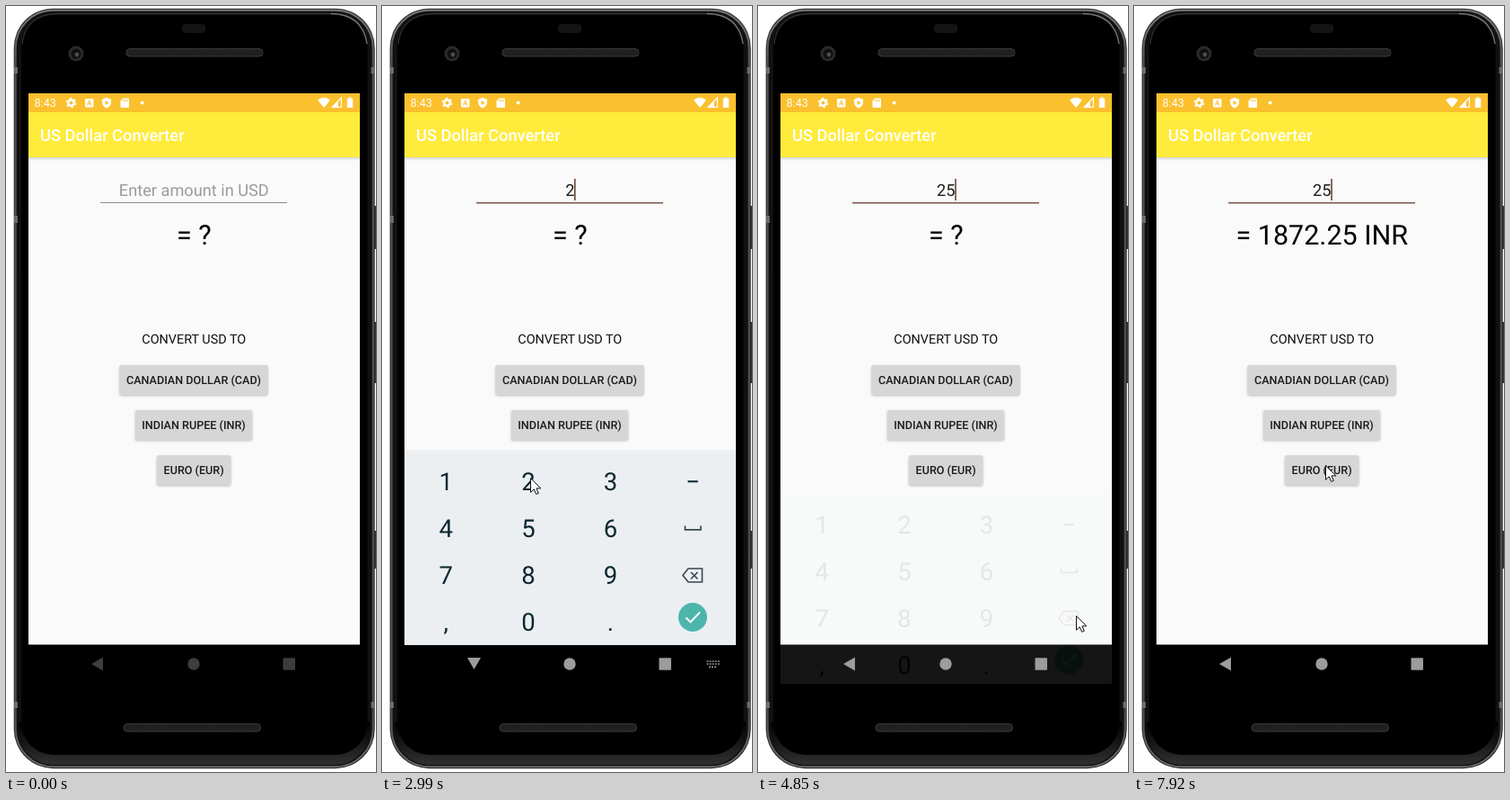
Recreate the animation shown at these times as an HTML page. Size 412 px wide and 851 px high, loop 8000 ms.

```html
<!DOCTYPE html>
<html lang="en">
<head>
<meta charset="utf-8">
<title>US Dollar Converter</title>
<style>
html, body { margin: 0; width: 100%; height: 100%; overflow: hidden; background: #fff; }
svg { display: block; width: 412px; height: 851px; }
text { font-family: Roboto, "Noto Sans", sans-serif; text-rendering: geometricPrecision; }
.mid { text-anchor: middle; }
.bold { font-weight: 500; }
</style>
</head>
<body>
<svg viewBox="0 0 412 851">
  <defs>
    <linearGradient id="rim" x1="0" y1="0" x2="0" y2="1">
      <stop offset="0" stop-color="#777"/><stop offset=".07" stop-color="#555"/>
      <stop offset=".93" stop-color="#505050"/><stop offset="1" stop-color="#6a6a6a"/>
    </linearGradient>
    <linearGradient id="shade" x1="0" y1="0" x2="0" y2="1">
      <stop offset="0" stop-color="#000" stop-opacity=".15"/><stop offset="1" stop-color="#000" stop-opacity="0"/>
    </linearGradient>
    <linearGradient id="foot" x1="0" y1="0" x2="0" y2="1">
      <stop offset="0" stop-color="#000"/><stop offset="1" stop-color="#303030"/>
    </linearGradient>
    <pattern id="mesh" width="3" height="3" patternUnits="userSpaceOnUse">
      <rect width="3" height="3" fill="#2c2c2c"/><path d="M0 0h1.5v1.5H0zM1.5 1.5H3V3H1.5z" fill="#141414"/>
    </pattern>
    <filter id="blur" x="-20%" y="-50%" width="140%" height="200%"><feGaussianBlur stdDeviation="1.4"/></filter>
    <clipPath id="window"><rect x="25" y="480" width="369" height="273"/></clipPath>
  </defs>

  <g id="phone">
    <path d="M410 222h2v48h-2zM410 351h2v68h-2zM410 583h2v42h-2z" fill="#333"/>
    <rect x="8.700" y="2.700" width="402" height="844.500" rx="44" fill="#2a2a2a"/>
    <rect x="10.700" y="4.700" width="398" height="840.500" rx="42" fill="#111" stroke="url(#rim)" stroke-width="2"/>
    <path d="M14 795H405V805A38 38 0 0 1 367 843H52A38 38 0 0 1 14 805Z" fill="url(#foot)"/>
    <rect x="17" y="10" width="385.500" height="822" rx="36" fill="#000"/>
    <path d="M362 8.500Q397 9 402 42" fill="none" stroke="#777" stroke-width="1.300"/>
    <path d="M18 42Q22 10 56 8.500H362" fill="none" stroke="#3c3c3c"/>
    <path d="M9 68h4v7h-4zM9 233h4v8h-4zM9 773h4v7h-4zM406.500 68h4v7h-4zM406.500 773h4v7h-4z" fill="#6d6d6d"/>
    <rect x="196" y="20" width="26" height="10" rx="4" fill="#141414"/>
    <circle cx="78" cy="53" r="8.500" fill="#2a2a2a"/>
    <circle cx="78" cy="53" r="5.500" fill="#101010"/>
    <circle cx="79" cy="54" r="2.400" fill="#4b4b4b"/>
    <rect x="134" y="47.500" width="152" height="8.500" rx="4" fill="url(#mesh)" stroke="#3a3a3a"/>
    <rect x="131" y="797.500" width="152.500" height="8.500" rx="4" fill="url(#mesh)" stroke="#3a3a3a"/>
  </g>

  <g id="app">
    <rect x="25" y="97" width="369" height="612.500" fill="#fafafa"/>
    <rect x="25" y="168" width="369" height="4" fill="url(#shade)"/>
    <rect x="25" y="97" width="369" height="21.500" fill="#fbc02d"/>
    <rect x="25" y="118" width="369" height="50" fill="#ffeb3b"/>
    <text x="38" y="150" font-size="18.300" class="bold" fill="#fff">US Dollar Converter</text>
  </g>

  <g id="status" fill="#fff">
    <text x="31.500" y="112" font-size="12.600">8:43</text>
    <circle cx="72.500" cy="107.500" r="3.200" fill="none" stroke="#fff" stroke-width="2.400"/>
    <circle cx="72.500" cy="107.500" r="4.800" fill="none" stroke="#fff" stroke-width="2" stroke-dasharray="2.500 2.527"/>
    <rect x="88" y="103" width="9.500" height="9.500" rx="1"/>
    <path d="M90.500 110.500L92.750 105L95 110.500M91.300 108.800H94.200" fill="none" stroke="#fbc02d"/>
    <path d="M112 101.800L117 103.700V107.500Q116.500 111.500 112 113.500Q107.500 111.500 107 107.500V103.700Z"/>
    <path d="M110.500 105L114.700 107.500L110.500 110Z" fill="#fbc02d"/>
    <path d="M130.500 102.500H136Q137 102.500 137 103.500V112Q137 113 136 113H128.500Q127.500 113 127.500 112V105.500Z"/>
    <path d="M130.700 104v2M132.700 104v2M134.700 104v2" stroke="#fbc02d"/>
    <circle cx="151.700" cy="107.500" r="1.900"/>
    <path d="M347 104.500Q354 99 361 104.500L354 113Z"/>
    <path d="M373.500 102V112.500H363Z" fill="none" stroke="#fff" stroke-width="1.200"/>
    <path d="M370 105.500V112.500H363Z"/>
    <path d="M381.500 101.500h3v1.200h1.700V113h-6.400V102.700h1.700Z"/>
  </g>

  <text id="amount" class="mid" x="209.300" y="211" font-size="18.200"></text>
  <rect x="105" y="218" width="208" height="1" fill="#8c8c8c"/>
  <rect id="line" y="218" height="1.500" fill="#795548"/>
  <rect id="caret" y="192" width="1.600" height="24" fill="#6d463b"/>
  <text id="result" class="mid" x="209.300" y="264.700" font-size="30.500"></text>
  <text class="mid" x="209.300" y="375" font-size="14.400" fill="#111">CONVERT USD TO</text>
  <g id="buttons"></g>

  <g clip-path="url(#window)"><g id="keyboard">
    <rect x="25" y="493" width="369" height="3" fill="#000" opacity=".04"/>
    <rect x="25" y="495" width="369" height="215" fill="#eceff1"/>
    <rect id="press" x="117.500" width="91.500" height="51.700" fill="#dae0e1"/>
    <g id="keys" fill="#0b2830" font-size="27.500"></g>
    <path d="M337.500 577.500V581.800H355V577.500" fill="none" stroke="#37474f" stroke-width="1.700"/>
    <path d="M341 625H356.500V640H341L335 632.500ZM344 629L351.500 636.500M351.500 629L344 636.500" fill="none" stroke="#37474f" stroke-width="1.600"/>
    <circle cx="346" cy="679" r="16" fill="#4db6ac"/>
    <path d="M338.500 679.500L343.500 684.500L354 673.500" fill="none" stroke="#fff" stroke-width="1.900"/>
  </g></g>

  <g id="nav">
    <path id="back" d="M95 731L108 723.500V738.500Z"/>
    <circle cx="209" cy="731" r="6.700"/>
    <rect x="308.500" y="724.300" width="13.500" height="13.500" rx=".8"/>
    <path id="switcher" d="M361.500 728H376M361.500 731H376M364 734.300H373" fill="none" stroke="#999" stroke-width="1.700" stroke-dasharray="1.900 1.200"/>
  </g>

  <path id="mouse" d="M.5 .7V16.300L4.200 12.800L6.700 18.400L9.300 17.300L6.900 11.900H11.800Z" fill="#fff" stroke="#111"/>
</svg>
<script>
const LOOP = 8000;
const $ = id => document.getElementById(id);
const set = (node, attrs) => { for (const k in attrs) node.setAttribute(k, attrs[k]); };
const clamp = v => Math.max(0, Math.min(1, v));
const span = (t, a, b) => clamp((t - a) / (b - a));
const smooth = p => p * p * (3 - 2 * p);
const show = (id, on) => set($(id), { visibility: on ? "visible" : "hidden" });

function add(parent, tag, attrs, text = "") {
  const node = document.createElementNS("http://www.w3.org/2000/svg", tag);
  set(node, attrs);
  node.textContent = text;
  parent.appendChild(node);
  return node;
}

// label, left, top, width, press time, release time
const buttons = [
  ["CANADIAN DOLLAR (CAD)", 126.5, 399, 165, 5870, 6120],
  ["INDIAN RUPEE (INR)", 144, 449, 130, 6840, 7060],
  ["EURO (EUR)", 168, 499.2, 82.2, LOOP, LOOP]
].map(([label, x, y, width, down, up]) => {
  const box = { x, width, height: 33, rx: 2 };
  const shadow = add($("buttons"), "rect", { ...box, y: y + 1, filter: "url(#blur)" });
  const face = add($("buttons"), "rect", { ...box, y });
  add($("buttons"), "text", { class: "mid bold", x: x + width / 2, y: y + 21, "font-size": 12.6, fill: "#1c1c1c" }, label);
  return { shadow, face, y, down, up };
});

["123−", "456", "789", ",0."].forEach((row, r) =>
  [...row].forEach((key, c) =>
    add($("keys"), "text", { class: "mid", x: 71.3 + c * 91.6, y: 538.3 + r * 52 }, key)));

// pointer stops: time, x, y
const stops = [
  [380, 318, 825], [690, 235, 225], [780, 242, 199],
  [2279, 242, 199], [2280, 235, 240], [2550, 165, 524],
  [3200, 165, 524], [3500, 161, 573],
  [3880, 161, 573], [4380, 354, 677],
  [5040, 354, 677], [5770, 221, 421],
  [6450, 221, 421], [6690, 213, 454],
  [7330, 213, 454], [7630, 213, 498], [7920, 213, 510]
];

function pointer(t) {
  const i = stops.findIndex(s => s[0] > t);
  if (i < 0) return stops[stops.length - 1].slice(1);
  const [t0, x0, y0] = stops[i - 1], [t1, x1, y1] = stops[i];
  const p = smooth(span(t, t0, t1));
  return [x0 + (x1 - x0) * p, y0 + (y1 - y0) * p];
}

const FOCUS = 1400, TWO = 2960, FIVE = 3690;

function drawField(t) {
  const typed = t >= FIVE ? "25" : t >= TWO ? "2" : "";
  $("amount").textContent = typed || "Enter amount in USD";
  set($("amount"), { fill: typed ? "#1c1c1c" : "#9b9b9b" });
  const half = 104 * span(t, FOCUS - 60, FOCUS + 100);
  set($("line"), { x: 209 - half, width: 2 * half });
  const since = t >= FIVE ? FIVE : t >= TWO ? TWO : FOCUS;
  set($("caret"), { x: 208.8 + 5.2 * typed.length });
  show("caret", t >= FOCUS && Math.floor((t - since) / 500) % 2 === 0);
  $("result").textContent = t >= 7080 ? "= 1872.25 INR" : t >= 6140 ? "= 33.25 CAD" : "= ?";
}

function drawButtons(t) {
  for (const b of buttons) {
    const k = span(t, b.down, b.down + 130) * (1 - span(t, b.up, b.up + 170));
    const grey = Math.round(214 - 28 * k);
    set(b.face, { fill: `rgb(${grey},${grey},${grey})` });
    set(b.shadow, { y: b.y + 1 + k, opacity: 0.25 + 0.03 * k });
  }
}

function drawKeyboard(t) {
  const opening = 1 - (1 - span(t, 1890, 2120)) ** 2;
  const closing = span(t, 4700, 4858) ** 2;
  const up = opening * (1 - closing);
  set($("keyboard"), { transform: `translate(0 ${52 * (1 - up)})`, opacity: up });
  show("keyboard", up > 0);
  const five = t >= 3590 && t < FIVE;
  set($("press"), { y: five ? 553.5 : 501.7, opacity: five || (t >= 2860 && t < TWO) ? 1 : 0 });

  const grey = Math.round(61 + 95 * span(t, 1110, 1330));
  set($("nav"), { fill: `rgb(${grey},${grey},${grey})` });
  const turn = smooth(span(t, 1900, 2080)) - smooth(span(t, 4640, 4800));
  set($("back"), { transform: `translate(${0.5 * turn} ${-turn}) rotate(${-90 * turn} 102 731)` });
  show("switcher", t >= 1450 && t < 4720);
}

function draw(t) {
  drawField(t);
  drawButtons(t);
  drawKeyboard(t);
  show("mouse", t >= 380);
  if (t >= 380) set($("mouse"), { transform: `translate(${pointer(t).map(Math.round)})` });
}

const start = performance.now();
function tick() {
  draw((performance.now() - start) % LOOP);
  requestAnimationFrame(tick);
}
tick();
</script>
</body>
</html>
```
